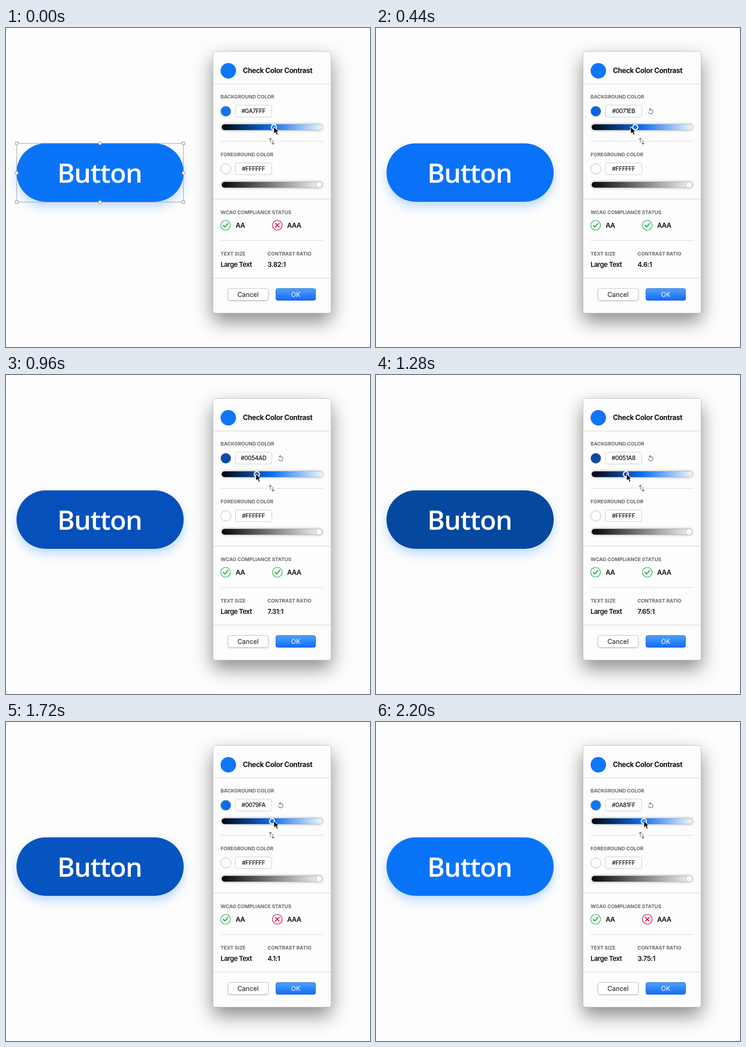
Animation of 799x701 px, one loop 2240 ms. Source, as an HTML page:

```html
<!DOCTYPE html>
<html lang="en">
<head>
<meta charset="utf-8">
<title>Check Color Contrast</title>
<style>
  html, body { margin: 0; width: 100%; height: 100%; overflow: hidden; background: #fdfdfd; }
  svg { display: block; }
  text { font-family: Inter, "Open Sans", sans-serif; fill: #111; }
  .title { font-size: 15.3px; font-weight: 700; letter-spacing: -.4px; }
  .label { font-size: 10.8px; font-weight: 700; fill: #6a6a6a; }
  .value { font-size: 14.8px; font-weight: 600; letter-spacing: -.65px; }
  .ratio { letter-spacing: -.5px; }
  .hex { font-size: 12.8px; font-weight: 500; letter-spacing: -.38px; text-anchor: middle; }
  .action { font-size: 14.2px; text-anchor: middle; }
  .big { font: 600 58.5px "Open Sans", "Noto Sans", sans-serif; letter-spacing: -1.5px; fill: #fff; }
  .rule { stroke: #cfcfcf; fill: none; }
  .field { fill: #fff; stroke: #c6c6c6; }
  .icon { fill: none; stroke: #707070; stroke-width: 1.3; stroke-linecap: round; stroke-linejoin: round; }
  .pass, .fail { fill: none; stroke: #2db653; stroke-width: 1.4; stroke-linecap: round; stroke-linejoin: round; }
  .fail { stroke: #c8184f; }
  .mark { stroke-width: 2.5; }
  .fail .mark { stroke-width: 2; }
</style>
</head>
<body>
<svg width="799" height="701" viewBox="0 0 799 701">
  <defs>
    <linearGradient id="blues">
      <stop offset="0" stop-color="#020407"/>
      <stop offset=".5" stop-color="#0a70f5"/>
      <stop offset="1" stop-color="#f0f7ff"/>
    </linearGradient>
    <linearGradient id="greys">
      <stop offset="0" stop-color="#050505"/>
      <stop offset="1" stop-color="#f6f6f6"/>
    </linearGradient>
    <linearGradient id="okFill" x2="0" y2="1">
      <stop offset="0" stop-color="#51a0fa"/>
      <stop offset="1" stop-color="#126bf6"/>
    </linearGradient>
    <filter id="panelShade" x="-40%" y="-20%" width="180%" height="145%" color-interpolation-filters="sRGB">
      <feDropShadow dx="0" dy="18" stdDeviation="21" flood-color="#000" flood-opacity=".45"/>
    </filter>
    <filter id="pillShade" x="-20%" y="-30%" width="140%" height="180%" color-interpolation-filters="sRGB">
      <feDropShadow dx="0" dy="11" stdDeviation="11" flood-color="#0a78ff" flood-opacity=".26"/>
    </filter>
    <filter id="softShade" x="-20%" y="-60%" width="140%" height="240%" color-interpolation-filters="sRGB">
      <feDropShadow dx="0" dy="1" stdDeviation="1.4" flood-color="#000" flood-opacity=".25"/>
    </filter>
    <filter id="trackShade" x="-10%" y="-120%" width="120%" height="340%" color-interpolation-filters="sRGB">
      <feDropShadow dx="0" dy="0" stdDeviation="3" flood-color="#000" flood-opacity=".34"/>
    </filter>
    <g id="check" class="pass">
      <circle r="10.6"/>
      <path class="mark" d="M-5 .3L-1.6 3.8L5.2-3.8"/>
    </g>
    <g id="cross" class="fail">
      <circle r="10.6"/>
      <path class="mark" d="M-4-4L4 4M4-4L-4 4"/>
    </g>
  </defs>

  <rect width="799" height="701" fill="#fdfdfd"/>

  <g filter="url(#pillShade)">
    <rect id="pill" x="23" y="253.5" width="367" height="128.5" rx="64.25"/>
  </g>
  <text class="big" x="112.5" y="340">Button</text>
  <g id="selection" fill="#fff" stroke="#8b8b8b">
    <rect x="23.5" y="253.5" width="366" height="129" fill="none" stroke="#9a9a9a"/>
  </g>

  <rect x="454.5" y="51.5" width="259" height="575" rx="5" fill="#fdfdfd" stroke="#bdbdbd" filter="url(#panelShade)"/>
  <path class="rule" d="M455 123H713M471 249H572M594 249H697M455 376H713M471 467H697M455 549.5H713"/>

  <circle cx="488" cy="94" r="17" fill="#0f76f9"/>
  <text class="title" x="520" y="99">Check Color Contrast</text>

  <text class="label" x="471" y="155.3">BACKGROUND COLOR</text>
  <circle id="swatch" cx="482.5" cy="183" r="11.2" stroke="#a3a3a3"/>
  <rect class="field" x="503.5" y="169.5" width="80" height="26" rx="4"/>
  <text id="hex" class="hex" x="543.4" y="187.4"></text>
  <g id="reset" class="icon">
    <path d="M600.3 179.2H604A4.7 4.7 0 1 1 598.3 184.3M602.6 176.5L599.8 179.2L602.6 181.9"/>
  </g>
  <rect x="473.5" y="211.8" width="221" height="12.4" rx="6.2" fill="url(#blues)" stroke="#00000026" filter="url(#trackShade)"/>
  <circle id="thumb" cy="218" r="5.6" stroke="#fff" stroke-width="2.4"/>
  <path class="icon" d="M580.3 251V242M577.6 244.7L580.3 242L583 244.7M586 246.5V255.5M583.3 252.8L586 255.5L588.7 252.8"/>

  <text class="label" x="471" y="281.8">FOREGROUND COLOR</text>
  <circle cx="482.5" cy="309.5" r="11.2" fill="#fff" stroke="#b0b0b0"/>
  <rect class="field" x="503.5" y="296.5" width="80" height="25.5" rx="4"/>
  <text class="hex" x="543.4" y="313.9">#FFFFFF</text>
  <rect x="473.5" y="338.3" width="221" height="12.4" rx="6.2" fill="url(#greys)" stroke="#00000026" filter="url(#trackShade)"/>
  <circle cx="687.5" cy="344.5" r="6.8" fill="#fbfbfb" stroke="#b5b5b5"/>

  <text class="label" x="471" y="408.5">WCAG COMPLIANCE STATUS</text>
  <use href="#check" x="482" y="433.5"/>
  <text class="value" x="504" y="439.3">AA</text>
  <use id="aaa" x="595.5" y="433.5"/>
  <text class="value" x="617" y="439.3">AAA</text>

  <text class="label" x="471" y="499.6">TEXT SIZE</text>
  <text class="value" x="471" y="525">Large Text</text>
  <text class="label" x="574" y="499.6">CONTRAST RATIO</text>
  <text id="ratio" class="value ratio" x="574" y="525"></text>

  <rect class="field" x="487.5" y="572.5" width="88" height="26" rx="4" filter="url(#softShade)"/>
  <text class="action" x="531.2" y="590.7">Cancel</text>
  <rect x="592.5" y="572.5" width="87" height="26" rx="4" fill="url(#okFill)" stroke="#1a64d8"/>
  <text class="action" x="636" y="590.7" style="fill:#fff">OK</text>

  <path id="cursor" d="M0 0V15.6L3.7 12.2L6.2 18L9 16.8L6.5 11.1H11.2Z" fill="#000" stroke="#fff" stroke-width="1.1" stroke-linejoin="round"/>
</svg>
<script>
const LOOP = 2240, STEP = 40;
const $ = id => document.getElementById(id);
const rgb = n => [n >> 16, n >> 8 & 255, n & 255];

// Each track is a list of [time, value parts].
const number = ([t, v]) => [t, [v]];
const colour = ([t, v]) => [t, rgb(v)];
const cursorX = [[0, 588], [200, 588], [440, 559], [560, 552], [760, 551], [960, 548.5],
  [1280, 550], [1400, 550], [1680, 588]].map(number);
const thumbX = [[0, 588], [240, 588], [440, 569], [600, 555], [760, 552], [960, 550.5],
  [1280, 548.5], [1420, 548.5], [1720, 584], [1800, 588]].map(number);
const picked = [[0, 0x0A7FFF], [240, 0x0A7FFF], [440, 0x0071EB], [760, 0x005BBD], [960, 0x0054AD],
  [1280, 0x0051A8], [1440, 0x0051A8], [1720, 0x0079FA], [1840, 0x0A81FF]].map(colour);
const pillFill = [[0, 0x0974F8], [440, 0x0972F8], [600, 0x096DF2], [760, 0x0960E5], [960, 0x0650BC],
  [1280, 0x05489F], [1600, 0x05489F], [1720, 0x0654BF], [2040, 0x0974F8]].map(colour);

function at(track, t) {
  const i = track.findIndex(k => k[0] > t);
  if (i < 0) return track[track.length - 1][1];
  const [t0, a] = track[i - 1], [t1, b] = track[i];
  return a.map((v, j) => v + (b[j] - v) * (t - t0) / (t1 - t0));
}

const css = c => `rgb(${c.map(Math.round)})`;
const toHex = c => '#' + c.map(v => v.toString(16).padStart(2, '0')).join('').toUpperCase();
const onScreen = ([r, g, b]) => [r + 6, g * .91, b * .975];

function contrastOnWhite(c) {
  const [r, g, b] = c.map(v => {
    v /= 255;
    return v <= .04045 ? v / 12.92 : ((v + .055) / 1.055) ** 2.4;
  });
  return 1.05 / (.2126 * r + .7152 * g + .0722 * b + .05);
}

for (const x of [23.5, 206.5, 389.5]) for (const y of [253.5, 318.5, 382.5]) {
  if (x === 206.5 && y === 318.5) continue;
  const box = document.createElementNS('http://www.w3.org/2000/svg', 'rect');
  const attrs = { x: x - 3, y: y - 3, width: 6, height: 6 };
  for (const k in attrs) box.setAttribute(k, attrs[k]);
  $('selection').append(box);
}

function draw(t) {
  const c = at(picked, t).map(Math.round);
  const ratio = contrastOnWhite(c);
  const fill = css(onScreen(c));
  const edited = toHex(c) !== '#0A7FFF';
  $('pill').setAttribute('fill', css(at(pillFill, t)));
  $('swatch').setAttribute('fill', fill);
  $('thumb').setAttribute('fill', fill);
  $('thumb').setAttribute('cx', at(thumbX, t)[0]);
  $('cursor').setAttribute('transform', `translate(${at(cursorX, t)[0]} 217)`);
  $('hex').textContent = toHex(c);
  $('ratio').textContent = Math.floor(ratio * 100) / 100 + ':1';
  $('aaa').setAttribute('href', ratio >= 4.5 ? '#check' : '#cross');
  $('selection').style.display = edited ? 'none' : '';
  $('reset').style.display = edited ? '' : 'none';
}

const start = performance.now();
function tick() {
  const t = (performance.now() - start) % LOOP;
  draw(Math.floor(t / STEP) * STEP);
  requestAnimationFrame(tick);
}
tick();
</script>
</body>
</html>
```
